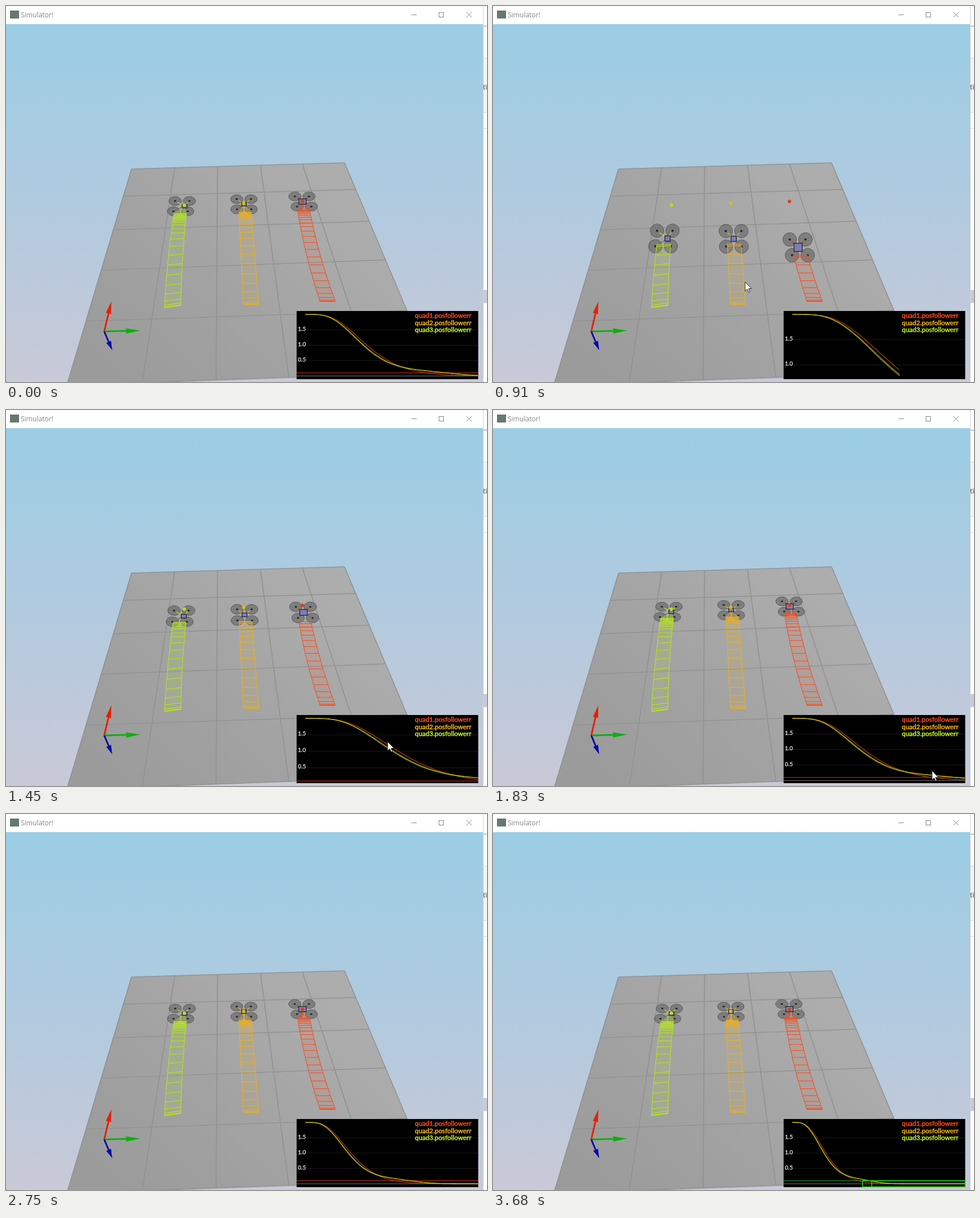
These frames come from a looping animation (847 px wide and 662 px high, 3750 ms). An HTML page with a canvas:

```html
<!DOCTYPE html>
<html lang="en">
<head>
<meta charset="utf-8">
<title>Simulator!</title>
<style>
  html, body { margin: 0; width: 100%; height: 100%; overflow: hidden; background: #fff; }
  canvas { display: block; }
</style>
</head>
<body>
<canvas id="stage" width="847" height="662"></canvas>
<script>
const c = document.getElementById('stage').getContext('2d');
const LOOP = 3750, STEP = 76.9, RESET = 110, LIFTOFF = 180;
const SPEED = 0.2615;          // chart pixels per millisecond
const RUNG = 18.5;             // spacing of trail rungs in chart pixels

// body: offset from rotor centre; trail: near and far edge ends and easing
const quads = [
  { name: 'quad1', color: '#f25022', half: 178, slow: 0, skew: 4, size: 13, body: [-1, 0],
    x: 523, y: 343.5, dx: 42, dy: 179, bow: 15, ease: 0.98, dot: [522, 344], dotColor: '#d94108',
    trail: { left: [513, 553], right: [534, 580], y: [356, 520], ease: 0.85, tilt: 0 } },
  { name: 'quad2', color: '#edb021', half: 168.5, slow: 0.1, skew: 0.5, size: 8.5, body: [0, 0],
    x: 419, y: 348, dx: 13.4, dy: 170, bow: 0, ease: 1.12, dot: [418.5, 347.5], dotColor: '#dfb90b',
    trail: { left: [410, 418], right: [432, 445], y: [361, 525], ease: 1.15, tilt: 0 } },
  { name: 'quad3', color: '#b5e51c', half: 166, slow: 0.1, skew: -3, size: 8.5, body: [5.5, 0],
    x: 309, y: 351.5, dx: -18, dy: 168, bow: 8, ease: 1.14, dot: [314, 350.5], dotColor: '#bfe00c',
    trail: { left: [296, 279], right: [318, 308], y: [363, 527], ease: 1.15, tilt: 4 } },
];

const lerp = (a, b, k) => a + (b - a) * k;

// piecewise linear lookup in rows of [key, value, ...]
function track(rows, key) {
  const next = rows.findIndex(r => r[0] > key);
  const i = next < 0 ? rows.length - 1 : Math.max(next, 1);
  const [a, b] = [rows[i - 1], rows[i]];
  const k = Math.min(1, Math.max(0, (key - a[0]) / (b[0] - a[0])));
  return a.slice(1).map((v, j) => lerp(v, b[j + 1], k));
}

const pitchTrack = [[0, .62], [40, .33], [87, .21], [130, .6], [189, 1], [250, .93], [330, .77], [430, .72]];
const cursorTrack = [[510, 315, 375], [903, 444, 486], [1441, 672, 584], [1825, 773, 635], [2100, 800, 700]];

// step response of five equal lags, plus a slow remainder
function error(q, p) {
  const a = 4.67 * p / q.half;
  let sum = 0, term = 1;
  for (let k = 1; k <= 5; k++) { sum += term; term *= a / k; }
  return 2 * Math.exp(-a) * sum + q.slow * Math.exp(-(((p - 350) / 110) ** 2));
}

function path(points, { fill, stroke, width = 1, close = false }) {
  c.beginPath();
  points.forEach(([x, y]) => c.lineTo(x, y));
  if (close) c.closePath();
  if (fill) { c.fillStyle = fill; c.fill(); }
  if (stroke) { c.strokeStyle = stroke; c.lineWidth = width; c.stroke(); }
}
const line = (x1, y1, x2, y2, stroke, width) => path([[x1, y1], [x2, y2]], { stroke, width });
function rect(x, y, w, h, fill) { c.fillStyle = fill; c.fillRect(x, y, w, h); }
function ellipse(x, y, rx, ry, fill, stroke) {
  c.beginPath();
  c.ellipse(x, y, rx, ry, 0, 0, 7);
  c.fillStyle = fill; c.fill();
  if (stroke) { c.strokeStyle = stroke; c.lineWidth = 1; c.stroke(); }
}
function text(s, x, y, font, fill, align = 'left', weight = 0) {
  c.font = font; c.fillStyle = c.strokeStyle = fill; c.textAlign = align;
  c.fillText(s, x, y);
  if (weight) { c.lineWidth = weight; c.strokeText(s, x, y); }
}
function gradient(x1, y1, x2, y2, ...colors) {
  const g = c.createLinearGradient(x1, y1, x2, y2);
  colors.forEach((col, i) => g.addColorStop(i / (colors.length - 1), col));
  return g;
}

function drawWindow() {
  rect(0, 0, 847, 662, '#fff');
  rect(841, 92, 6, 95, '#f3f4f6');
  for (const y of [35, 91, 187, 215]) rect(841, y, 6, 1, y === 35 ? '#8d9095' : '#d9dbdf');
  rect(840, 105, 1, 25, '#b9bcc0');
  text('tie', 840, 147, '12px "Open Sans", sans-serif', '#444');
  rect(840, 500, 7, 23, '#c6cad5');
  rect(0, 0, 840, 32, '#fff');
  rect(7, 8, 16, 14, '#68786f');
  text('Simulator!', 26, 20, '12px "Open Sans", sans-serif', '#858585');
  line(714, 15.5, 723, 15.5, '#858585');
  c.strokeStyle = '#858585'; c.strokeRect(762.5, 11.5, 8, 8);
  line(811, 11, 820, 20, '#858585');
  line(820, 11, 811, 20, '#858585');
  rect(0, 32, 840, 630, gradient(0, 32, 0, 662, '#9acde4', '#b1cadf', '#c9c9d7'));
  rect(840, 0, 1, 662, '#d0d2d6');
}

function drawFloor() {
  const lines = [[221, 287, 596, 276], [207, 335, 616, 323], [189, 394, 639, 379], [169, 465, 669, 447],
    [142, 555, 706, 536], [107, 668, 752, 645], [221, 287, 107, 668], [297, 284.5, 240, 663],
    [372.5, 282.5, 370, 658], [448, 280, 498, 654], [522, 278, 645, 650], [596, 276, 752, 645]];
  c.save();
  c.beginPath(); c.rect(0, 32, 840, 630); c.clip();
  path([[221, 287], [596, 276], [752, 645], [107, 668]],
    { fill: gradient(180, 640, 520, 280, '#9b9b9b', '#a3a3a3', '#adadad'), close: true });
  for (const l of lines) line(...l, '#929292', 1.7);
  c.restore();
}

function arrow(x1, y1, x2, y2, head, color) {
  const len = Math.hypot(x2 - x1, y2 - y1), ux = (x2 - x1) / len, uy = (y2 - y1) / len;
  const bx = x2 - ux * head, by = y2 - uy * head;
  line(x1, y1, bx, by, color, 3);
  path([[x2, y2], [bx - uy * 4.6, by + ux * 4.6], [bx + uy * 4.6, by - ux * 4.6]], { fill: color, close: true });
}

function drawTrail(q, p, bodyPos) {
  const tr = q.trail;
  const rung = at => {
    const w = Math.min(1, error(q, at) / 2) ** tr.ease, bow = q.bow * w * (1 - w);
    const y = lerp(...tr.y, w);
    return [[lerp(...tr.left, w) - bow, y + tr.tilt * w], [lerp(...tr.right, w) - bow, y]];
  };
  const rungs = [], end = Math.min(p, 450);
  for (let at = 0; at < end; at += RUNG) rungs.push(rung(at));
  rungs.push(rung(end));
  const left = rungs.map(r => r[0]), right = rungs.map(r => r[1]);
  c.globalAlpha = 0.1;
  path([...left, ...right.slice().reverse()], { fill: q.color });
  c.globalAlpha = 0.9;
  for (const edge of [left, right, ...rungs]) path(edge, { stroke: q.color, width: 1.2 });
  if (p > 380) {
    c.globalAlpha = 0.35;
    path([left.at(-1), bodyPos, right.at(-1)], { fill: q.color, stroke: q.color });
  }
  c.globalAlpha = 1;
}

function drawQuad(q, p) {
  const u = error(q, p) / 2, w = u ** q.ease;
  const x = q.x + q.dx * w - q.bow * w * (1 - w), y = q.y + q.dy * w;
  const [pitch] = track(pitchTrack, p);
  const span = 25 + 6 * u, r = span * 0.435;
  const bx = x + q.body[0] * (1 + 0.4 * u), by = y + q.body[1];
  for (const sy of [-1, 1]) for (const sx of [-1, 1]) {
    const rx = x + sx * span / 2 + sy * q.skew / 2, ry = y + sy * span * pitch / 2;
    ellipse(rx, ry, r, r * pitch, 'rgba(105,105,105,.68)', '#5c5c5c');
    line(bx, by, lerp(bx, rx, 0.75), lerp(by, ry, 0.75), sy < 0 ? q.dotColor : '#77705a', 1.4);
    ellipse(rx, ry, 2, 2 * Math.max(pitch, 0.6), '#26262b');
  }
  drawTrail(q, p, [bx, by]);
  const bw = q.size * (1 + 0.25 * u), bh = bw * Math.max(pitch, 0.68);
  c.fillStyle = '#7f80b2'; c.strokeStyle = '#26263f'; c.lineWidth = 1.4;
  c.fillRect(bx - bw / 2, by - bh / 2, bw, bh);
  c.strokeRect(bx - bw / 2, by - bh / 2, bw, bh);
  ellipse(...q.dot, 3, 3, q.dotColor);
}

function drawChart(p, settled) {
  const low = Math.min(...quads.map(q => error(q, p)), 1.99);
  const valueY = v => 543 + 108 * (2 - v) / (2 - low);
  const scale = Math.min(1, 304 / Math.max(p, 1));
  c.save();
  c.beginPath(); c.rect(511.5, 537, 320.5, 120); c.clip();
  rect(511.5, 537, 320, 120, '#000');
  const step = [.01, .02, .05, .1, .2, .5].find(s => (2 - low) / s < 5) || 0.5;
  for (let i = 1; 2 - i * step > 0.001 && valueY(2 - i * step) < 652; i++) {
    const v = 2 - i * step, y = valueY(v);
    line(512, y, 831, y, '#1d1d1d');
    text(v.toFixed(step < 0.1 ? 2 : 1), 514, y + 1.5, '10px Lato, sans-serif', '#e8e8e8', 'left', 0.3);
  }
  line(512, valueY(0), 831, valueY(0), '#777');
  const limit = valueY(0.1);
  line(512, limit, 831, limit, settled ? '#1f8f1f' : '#b52a16', 1.3);
  c.globalAlpha = 0.8;
  for (const q of quads) {
    const points = [];
    for (let x = 0; x <= p * scale; x += 1.5) points.push([527 + x, valueY(error(q, x / scale))]);
    points.push([527 + p * scale, valueY(error(q, p))]);
    path(points, { stroke: q.color, width: 1.1 });
  }
  c.globalAlpha = 1;
  quads.forEach((q, i) => text(q.name + '.posfollowerr', 819.5, 549.3 + 12.3 * i,
    '11.7px Lato, sans-serif', ['#ff4a1c', '#f5b51c', '#c0f51c'][i], 'right', 0.5));
  c.restore();
  if (settled) {
    c.strokeStyle = '#12e012'; c.lineWidth = 1.4;
    for (const start of [372, 420]) {
      const x = 527 + start * scale;
      c.strokeRect(x, limit, 831.5 - x, 656.5 - limit);
    }
  }
}

function drawCursor(t) {
  const [x, y] = track(cursorTrack, t);
  const shape = [[0, 0], [0, 16], [3.7, 12.6], [6.3, 18], [8.6, 17], [6, 11.8], [11, 11.5]];
  path(shape.map(([a, b]) => [x + a, y + b]), { fill: '#fff', stroke: '#222', close: true });
}

function draw(now) {
  const clock = now % LOOP;
  const t = Math.max(0, Math.floor((clock + 20) / STEP) * STEP - 20);
  const p = SPEED * (t < RESET ? t + 1904 : Math.max(0, t - LIFTOFF));
  drawWindow();
  drawFloor();
  arrow(173, 573, 185.5, 520, 22, '#e61e06');
  arrow(173, 573, 236.5, 571.5, 25, '#0cb00c');
  arrow(173, 573, 187, 606, 16, '#0808ac');
  for (const q of quads) drawQuad(q, p);
  drawChart(p, t > 3440);
  if (t >= RESET && t < 2050) drawCursor(t);
}

const start = performance.now();
function frame() {
  draw(performance.now() - start);
  requestAnimationFrame(frame);
}
frame();
</script>
</body>
</html>
```
